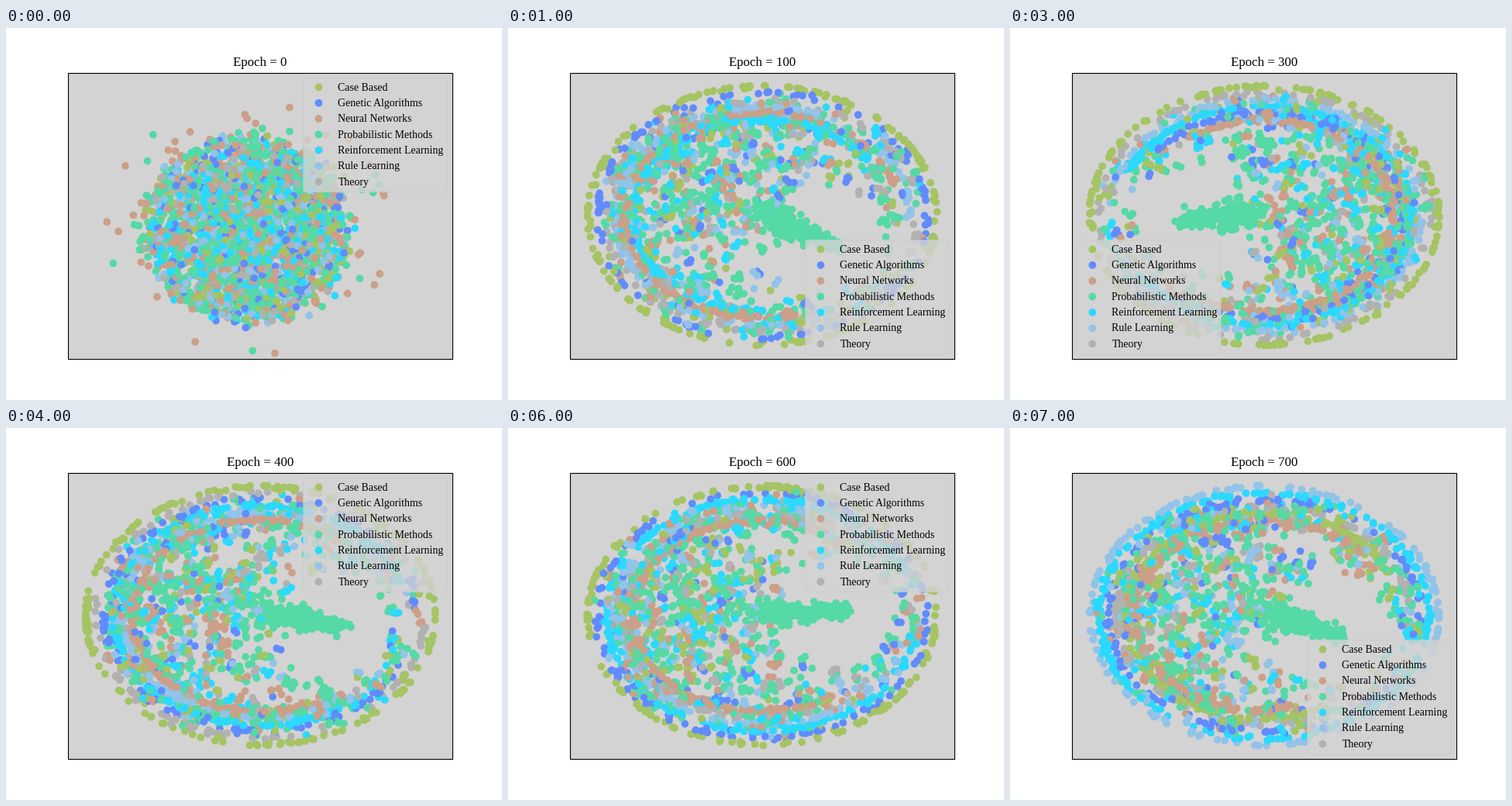
Recreate the animation shown at these times as a matplotlib script. Size 640 by 480 pixels, loop 8000 ms.

```python
import numpy as np
import matplotlib.pyplot as plt
from matplotlib.animation import FuncAnimation
from matplotlib.patches import FancyBboxPatch, Rectangle

plt.rcParams["font.family"] = "Liberation Serif"
rng = np.random.default_rng(7)

LABELS = ["Case Based", "Genetic Algorithms", "Neural Networks",
          "Probabilistic Methods", "Reinforcement Learning",
          "Rule Learning", "Theory"]
COLORS = ["#a5c463", "#608cff", "#cc9f88", "#55d9a5",
          "#2bd9ff", "#92c3e8", "#b1b1b1"]
SIZES = [351, 217, 418, 818, 426, 298, 180]
NEURAL, PROB = 2, 3

CENTER = np.array([328, 242])
RADII = np.array([225, 167])
TOTAL = sum(SIZES)
shuffle = rng.permutation(TOTAL)
classes = np.repeat(np.arange(7), SIZES)


def polar(r, a, center=CENTER, radii=RADII):
    return center + radii * np.column_stack([r * np.cos(a), -r * np.sin(a)])


def ring(n, rank, heading):
    """Ribbon of n points; inner ranks open up on the side of the tail."""
    spread = np.pi * min(1, 1.12 - 0.09 * rank)
    r = 1 - 0.052 * rank + rng.normal(0, 0.01, n)
    return polar(np.minimum(r, 1.004), heading + rng.uniform(-spread, spread, n))


def interior(n, heading):
    """Small clumps, mostly on the heading side, none in the tail's hollow."""
    m = 8 * n
    near = polar(np.sqrt(rng.uniform(0, 0.76, m)), rng.normal(heading, 1.25, m))
    rim = polar(rng.uniform(0.68, 0.95, m), rng.uniform(0, 2 * np.pi, m))
    p = np.where(rng.random((m, 1)) < 0.72, near, rim)
    hollow = polar(0.42, heading + np.pi)
    p = p[np.hypot(*((p - hollow) / (76, 68)).T) > 1][:n * 7 // 10]
    return rng.choice(p, n) + rng.normal(0, 3, (n, 2))


def tail(n, heading):
    """Streak from a rounded tip in the hollow to the middle of the cloud."""
    t = rng.random((n, 1))
    tip = polar(0.49, heading + np.pi)
    return tip + (CENTER - 5 - tip) * t + rng.normal(0, 1, (n, 2)) * (4 + 6 * t)


def rings(tail_angle, order):
    """Classes as nested rings, outermost first; the rest forms the tail."""
    heading = np.radians(tail_angle + 180)
    points = np.empty((TOTAL, 2))
    for k, size in enumerate(SIZES):
        if k == PROB:
            n = size * 3 // 10
            shape = tail(n, heading)
        else:
            n = size // 2
            shape = ring(n, order.index(str(k)), heading)
        points[classes == k] = np.vstack([shape, interior(size - n, heading)])
    return points


def ball():
    """Untrained cloud; a few points of two classes stray far out."""
    r = rng.random(TOTAL) ** 0.55 + rng.normal(0, 0.06, TOTAL)
    odds = np.select([classes == NEURAL, classes == PROB], [0.09, 0.025], 0)
    stray = rng.random(TOTAL) < odds
    r[stray] = 1 + rng.exponential(0.24, stray.sum())
    a = rng.uniform(0, 2 * np.pi, TOTAL)
    return polar(np.minimum(r, 1.4), a, (312, 259), (130, 117))


# Tail direction in degrees and ring order of the classes per view
LAYOUTS = [(-30, "016524"), (231, "016254"), (185, "065412"),
           (-10, "061452"), (207, "062145"), (3, "014562"), (-20, "541602")]
VIEWS = [ball()] + [rings(*layout) for layout in LAYOUTS]
CORNERS = ["ur", "lr", "lr", "ll", "ur", "ul", "ur", "lr"]

fig = plt.figure(figsize=(6.4, 4.8), dpi=100, facecolor="white")
ax = fig.add_axes([0, 0, 1, 1])
ax.set(xlim=(0, 640), ylim=(480, 0))
ax.axis("off")

area = dict(xy=(80, 57.6), width=496, height=369.6)
ax.add_patch(Rectangle(**area, facecolor="lightgrey", edgecolor="none", zorder=1))
ax.add_patch(Rectangle(**area, fill=False, edgecolor="black", lw=0.8, zorder=3))
title = ax.text(328, 49.3, "", fontsize=12.2, ha="center", va="baseline")
dots = ax.scatter(*VIEWS[0].T, c=np.array(COLORS)[classes[shuffle]], s=36, zorder=2)

box = FancyBboxPatch((0, 0), 185, 146.8,
                     boxstyle="round,pad=0,rounding_size=2.78",
                     facecolor="lightgrey", edgecolor="0.8", lw=1,
                     alpha=0.8, zorder=5)
ax.add_patch(box)
row_y = 11.8 + 20.33 * np.arange(7)
keys = ax.scatter(np.zeros(7), row_y, c=COLORS, s=36, zorder=6)
names = [ax.text(0, 0, s, fontsize=10, va="baseline", zorder=6) for s in LABELS]


def place_legend(corner):
    x = 384 if corner[1] == "r" else 86.9
    y = 64.6 if corner[0] == "u" else 273.8
    box.set_x(x)
    box.set_y(y)
    keys.set_offsets(np.column_stack([np.full(7, x + 19.45), y + row_y]))
    for name, dy in zip(names, row_y):
        name.set_position((x + 44.45, y + dy + 4.2))


def draw(i):
    title.set_text(f"Epoch = {100 * i}")
    dots.set_offsets(VIEWS[i][shuffle])
    place_legend(CORNERS[i])
    return [title, dots, box, keys, *names]


anim = FuncAnimation(fig, draw, frames=len(VIEWS), interval=1000,
                     repeat=True, repeat_delay=0)
plt.show()
```
